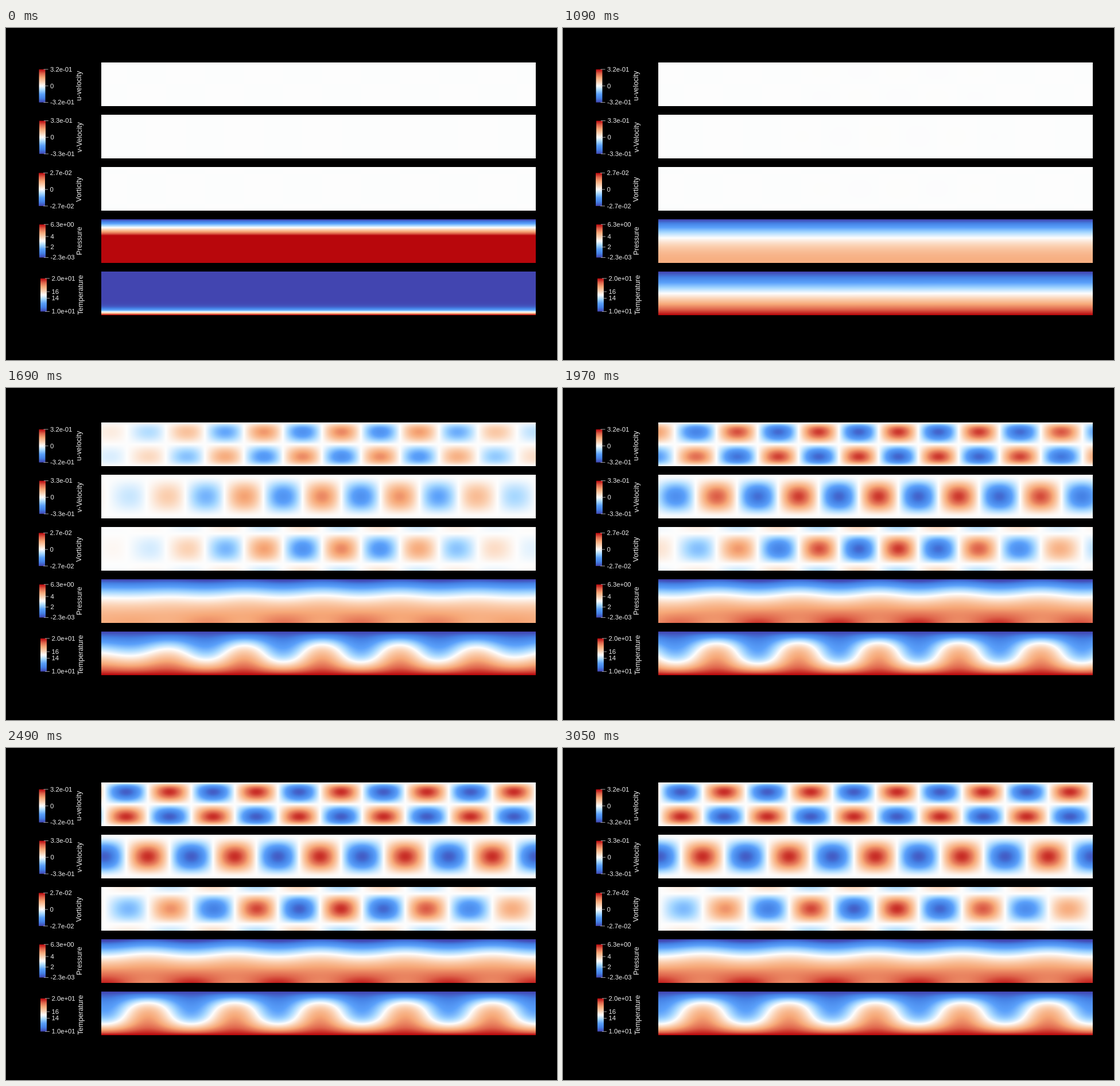
Recreate the animation shown at these times as an HTML page with a canvas. Size 960 by 578 pixels, loop 3.07 s.

```html
<!DOCTYPE html>
<html lang="en">
<head>
<meta charset="utf-8">
<title>Convection cells</title>
<style>
  html, body { margin: 0; width: 100%; height: 100%; overflow: hidden; background: #000; }
  canvas, svg { position: absolute; left: 0; top: 0; width: 100%; height: 100%; display: block; }
  text { font-family: "Liberation Sans", Arial, sans-serif; fill: #eee; }
  .num { font-size: 11.3px; }
  .name { font-size: 12.3px; text-anchor: middle; }
</style>
</head>
<body>
<canvas id="fields" width="960" height="578"></canvas>
<svg id="labels" viewBox="0 0 960 578"></svg>
<script>
const LOOP = 3070, LEFT = 166, TOP = 60, PITCH = 91, W = 757, H = 76, BAR = 57.6;
const { PI, sin, cos, exp, abs, tanh } = Math;
const ctx = document.getElementById('fields').getContext('2d');

// Evenly spaced colours from the lowest to the highest value
const colours = ['#4245b0', '#4480e4', '#5aa0fa', '#a5d7ff', '#fdfdfd',
  '#fbd2b4', '#f6a878', '#de644b', '#b8060c'];

const lut = Uint32Array.from({ length: 1024 }, (_, i) => {
  const pos = i / 1024 * (colours.length - 1), k = Math.floor(pos), f = pos - k;
  const [r, g, b] = [1, 3, 5].map(c => {
    const [from, to] = [k, k + 1].map(j => parseInt(colours[j].slice(c, c + 2), 16));
    return Math.round(from + (to - from) * f);
  });
  return (255 << 24 | b << 16 | g << 8 | r) >>> 0;
});

// Rolls widen from the side walls inwards until they share the width evenly
function rollX(j, n) {
  const late = Math.max(0, n - 38);
  const spread = k => 1 - exp(-late * late * (1 + abs(k)) / 400);
  return 550 - 7 * spread(0) + j * (68 + 7.3 * spread(j));
}

// Logistic growth that starts near the middle
function strength(x, n) {
  const d = (x - 575) / 233;
  return .9 / (1 + exp(d * d - .8 - .45 * (n - 38)));
}

function columns(n) {
  let j = -7;
  return Array.from({ length: W }, (_, i) => {
    const x = LEFT + i;
    while (x > rollX(j + 1, n)) j++;
    const a = rollX(j, n), phase = PI * (j + (x - a) / (rollX(j + 1, n) - a));
    const amp = strength(x, n), d = (x - 560) / 360;
    return {
      amp,
      up: amp * cos(phase),
      side: amp * sin(phase),
      spin: amp * sin(phase) * (1 - .6 * d * d),
      heat: 1.15 * tanh(1.4 * amp),
      plume: 1.15 * tanh(1.4 * amp) * cos(phase)
    };
  });
}

// Heat spreading from the hot floor into a cold layer
function conduction(y, n) {
  let t = y;
  for (let m = 1; m < 40; m++)
    t += 2 / (m * PI) * (m % 2 ? -1 : 1) * sin(m * PI * y) * exp(-m * m * (.42 * n + .05));
  return t;
}

// Each field takes a depth and a step and returns the scaled value per column
const horizontal = y => {
  const g = 5.2 * y * (1 - y) * (1 - 2 * y);
  return c => .5 + c.side * g;
};
const vertical = y => {
  const g = 8 * (y * (1 - y)) ** 2;
  return c => .5 + c.up * g;
};
const vorticity = y => {
  const g = cos(PI / 1.4 * abs(2 * y - 1));
  const k = g < 0 ? .2 * g : .5 * g;
  return c => .5 + c.spin * k;
};
const pressure = (y, n) => {
  const cold = exp(-.5 * n);
  const base = 2.7 * y * cold + (1.5 * y - .77 * y * y) * (1 - cold);
  const wave = .05 - .14 * y ** 3;
  return c => base + .19 * y * c.amp ** 2 + wave * c.up;
};
const temperature = (y, n) => {
  const base = conduction(y, n), s1 = .23 * sin(PI * y), s2 = .085 * sin(2 * PI * y);
  return c => base + c.plume * s1 + c.heat ** 2 * s2;
};

// x and y place the colour bar; lo and hi are the ends of its scale
const panels = [
  { field: horizontal, name: 'u-velocity', x: 57.5, y: 72, lo: -.32, hi: .32, ticks: [0] },
  { field: vertical, name: 'v-Velocity', x: 58, y: 161.5, lo: -.33, hi: .33, ticks: [0] },
  { field: vorticity, name: 'Vorticity', x: 57, y: 252.3, lo: -.027, hi: .027, ticks: [0] },
  { field: pressure, name: 'Pressure', x: 58, y: 342, lo: -.0023, hi: 6.3, ticks: [2, 4] },
  { field: temperature, name: 'Temperature', x: 60, y: 436, lo: 10, hi: 20, ticks: [14, 16] }
];

const image = ctx.createImageData(W, H);
const pixels = new Uint32Array(image.data.buffer);

function draw(n) {
  const cols = columns(n);
  panels.forEach(({ field }, k) => {
    for (let row = 0; row < H; row++) {
      const value = field(row / (H - 1), n);
      for (let i = 0; i < W; i++) {
        const v = Math.min(1, Math.max(0, value(cols[i])));
        pixels[row * W + i] = lut[Math.round(v * 1023)];
      }
    }
    ctx.putImageData(image, LEFT, TOP + PITCH * k);
  });
}

const scientific = v => v.toExponential(1).replace(/(\d)$/, '0$1');

function legend({ name, x, y, lo, hi, ticks }) {
  const mark = (v, label) => {
    const ty = y + BAR * (hi - v) / (hi - lo);
    return `<path d="M${x + 8} ${ty}h8" stroke="#ccc" stroke-width=".8"/>` +
      `<text class="num" x="${x + 19.5}" y="${ty + 3.8}">${label}</text>`;
  };
  return `<rect x="${x}" y="${y}" width="11" height="${BAR}" fill="url(#map)"/>` +
    [lo, hi].map(v => mark(v, scientific(v))).join('') +
    ticks.map(v => mark(v, v)).join('') +
    `<text class="name" transform="translate(${x + 73.5} ${y + BAR / 2}) rotate(-90)">${name}</text>`;
}

const shades = colours.map((c, i) =>
  `<stop offset="${i / (colours.length - 1)}" stop-color="${c}"/>`).join('');
document.getElementById('labels').innerHTML =
  `<defs><linearGradient id="map" x1="0" y1="1" x2="0" y2="0">${shades}</linearGradient></defs>` +
  panels.map(legend).join('');

// Steps come in threes: two short holds, then a long one
function stepAt(t) {
  const s = t < 690 ? t : t + 30;
  return 3 * Math.floor(s / 140) + Math.min(2, Math.floor(s % 140 / 20));
}

const start = performance.now();
let shown = -1;
function tick() {
  const n = stepAt((performance.now() - start) % LOOP);
  if (n !== shown) draw(shown = n);
  requestAnimationFrame(tick);
}
tick();
</script>
</body>
</html>
```
